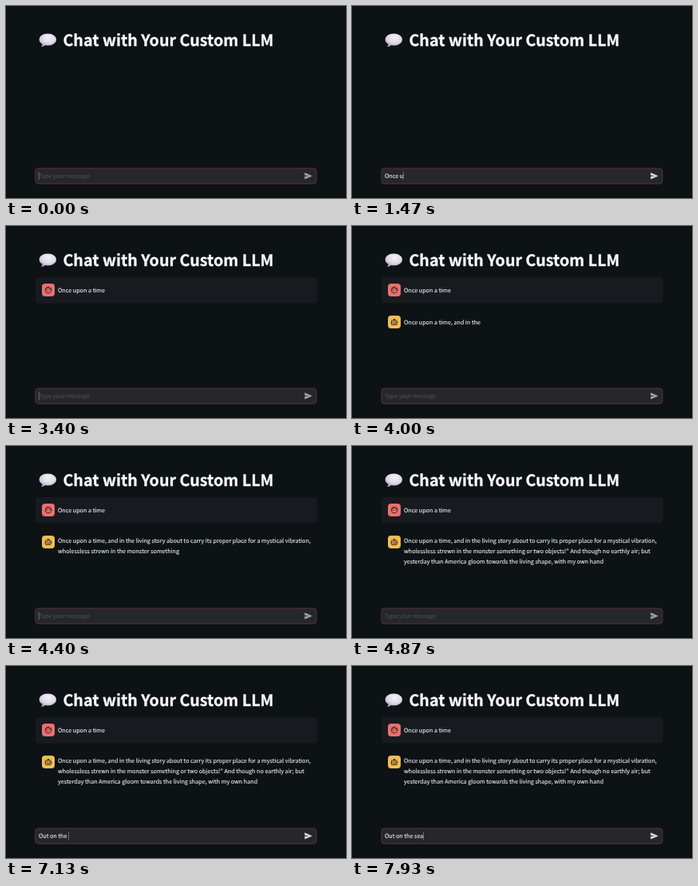
Animation, 426 px wide and 240 px high, one loop 8000 ms. Source, as an HTML page:

```html
<!DOCTYPE html>
<html lang="en">
<head>
<meta charset="utf-8">
<title>Chat</title>
<style>
  html, body { margin: 0; width: 100%; height: 100%; overflow: hidden; background: #0d1215; }
  svg { display: block; width: 100vw; height: 100vh; }
  text {
    font: 7.19px "Noto Sans CJK JP", "Noto Sans CJK SC", "Noto Sans CJK", "Open Sans", sans-serif;
    fill: #e8e8ea;
    stroke: #e8e8ea;
    stroke-width: .14;
    white-space: pre;
    text-rendering: geometricPrecision;
  }
  #title { font-size: 19.72px; font-weight: 700; fill: #fafafa; stroke: #fafafa; stroke-width: .3; }
  #hint { fill: #53555b; stroke: none; }
  .icon { fill: none; stroke: #22191a; stroke-width: 2; stroke-linecap: round; stroke-linejoin: round; }
  .icon .solid { fill: #22191a; stroke: none; }
</style>
</head>
<body>
<svg viewBox="0 0 426 240">
  <defs>
    <radialGradient id="bubble" cx=".55" cy=".3" r=".75">
      <stop offset="0" stop-color="#f3f0f8"/>
      <stop offset=".55" stop-color="#dedae8"/>
      <stop offset="1" stop-color="#a29db3"/>
    </radialGradient>
  </defs>

  <path fill="url(#bubble)" transform="translate(0 .4)" d="M52.3 34C58.3 34 63 37.2 63 41.5S58.3 49 52.3 49Q50.7 49 49.2 48.7Q47 50.5 43.8 50.6Q45.6 49 45.5 47.2C43 45.9 41.6 43.8 41.6 41.5C41.6 37.2 46.3 34 52.3 34Z"/>
  <text id="title" x="71.4" y="49.9">Chat with Your Custom LLM</text>

  <g id="user">
    <rect x="37" y="64" width="352.5" height="32.5" rx="4" fill="#171b20"/>
    <rect x="45" y="72" width="16" height="16" rx="4" fill="#e9706e"/>
    <g class="icon" transform="translate(48 75) scale(.417)">
      <circle cx="12" cy="12" r="9"/>
      <path d="M3.5 11Q8.5 9.5 10.5 4.5Q14 10 20.5 9"/>
      <circle class="solid" cx="9" cy="13.2" r="1.4"/>
      <circle class="solid" cx="15" cy="13.2" r="1.4"/>
    </g>
    <text x="65" y="82.9">Once upon a time</text>
  </g>

  <g id="bot">
    <rect x="45" y="112" width="16" height="16" rx="4" fill="#efbd55"/>
    <g class="icon" transform="translate(48 115) scale(.417)">
      <path d="M5 7H19V20H5ZM12 7V4M2.5 12V15M21.5 12V15M9 16.5H15"/>
      <circle class="solid" cx="12" cy="3.5" r="2"/>
      <circle class="solid" cx="9" cy="12" r="1.6"/>
      <circle class="solid" cx="15" cy="12" r="1.6"/>
    </g>
    <text class="line" x="65"></text>
    <text class="line" x="65"></text>
    <text class="line" x="65"></text>
  </g>

  <rect x="36.8" y="202.9" width="352.2" height="19.3" rx="3.6" fill="#26272c" stroke="#65383d" stroke-width=".8"/>
  <text id="hint" x="41" y="215.2">Type your message</text>
  <text id="typed" x="41" y="215.2"></text>
  <rect id="caret" y="207.3" width=".7" height="10.2" fill="#85878c"/>
  <path id="send" transform="translate(373.5 207.3) scale(.43)" stroke-width=".6" stroke-linejoin="round" d="M2 21L23 12L2 3V10L17 12L2 14Z"/>
  <rect x="425" width="1" height="240" fill="#06090a"/>
</svg>

<script>
const LOOP = 8000, FRAME = 200 / 3;
const SUBMIT = 3330, BOT = 3530, STREAM = 3860, WORD = 22;

const prompts = [
  { text: "Once upon a time", from: 0, to: SUBMIT,
    keys: [670, 870, 930, 1130, 1330, 1470, 1730, 1930, 2070, 2200, 2330, 2470, 2730, 2870, 3000, 3070] },
  { text: "Out on the sea", from: SUBMIT, to: LOOP,
    keys: [5730, 5930, 6070, 6200, 6400, 6530, 6600, 6670, 6800, 6930, 7070, 7530, 7730, 7930] }
];
const reply = [
  "Once upon a time, and in the living story about to carry its proper place for a mystical vibration,",
  "wholessless strewn in the monster something or two objects!\" And though no earthly air; but",
  "yesterday than America gloom towards the living shape, with my own hand"
].map(line => line.split(" "));

const $ = id => document.getElementById(id);
const lines = document.querySelectorAll(".line");
const show = (el, on) => el.setAttribute("visibility", on ? "visible" : "hidden");
const write = (el, text) => { if (el.textContent !== text) el.textContent = text; };

function drawInput(t) {
  const { text, keys } = prompts.find(p => t >= p.from && t < p.to);
  const count = keys.filter(k => k <= t).length;
  const tint = count ? "#e6e7ea" : "#abadb2";
  write($("typed"), text.slice(0, count));
  show($("hint"), !count);
  $("send").setAttribute("fill", tint);
  $("send").setAttribute("stroke", tint);

  // The empty field's caret blinks; typing keeps it lit.
  const blink = t < SUBMIT ? t < 270 : (t - 3200) % 1000 < 500;
  show($("caret"), count || blink);
  $("caret").setAttribute("x", 41 + (count ? $("typed").getComputedTextLength() : -.2));
}

function drawReply(t) {
  show($("user"), t >= SUBMIT);
  show($("bot"), t >= BOT);
  const tick = Math.floor((t + 5) / FRAME) * FRAME;
  let left = Math.max(0, Math.floor((tick - STREAM) / WORD) + 1);
  // A single line is centred beside the avatar.
  const top = left > reply[0].length ? 121.3 : 122.9;
  reply.forEach((words, i) => {
    write(lines[i], words.slice(0, left).join(" "));
    lines[i].setAttribute("y", top + i * 12.8);
    left = Math.max(0, left - words.length);
  });
}

function draw(now) {
  const t = now % LOOP;
  drawInput(t);
  drawReply(t);
}

const start = performance.now();
function loop() {
  draw(performance.now() - start);
  requestAnimationFrame(loop);
}
loop();
</script>
</body>
</html>
```
